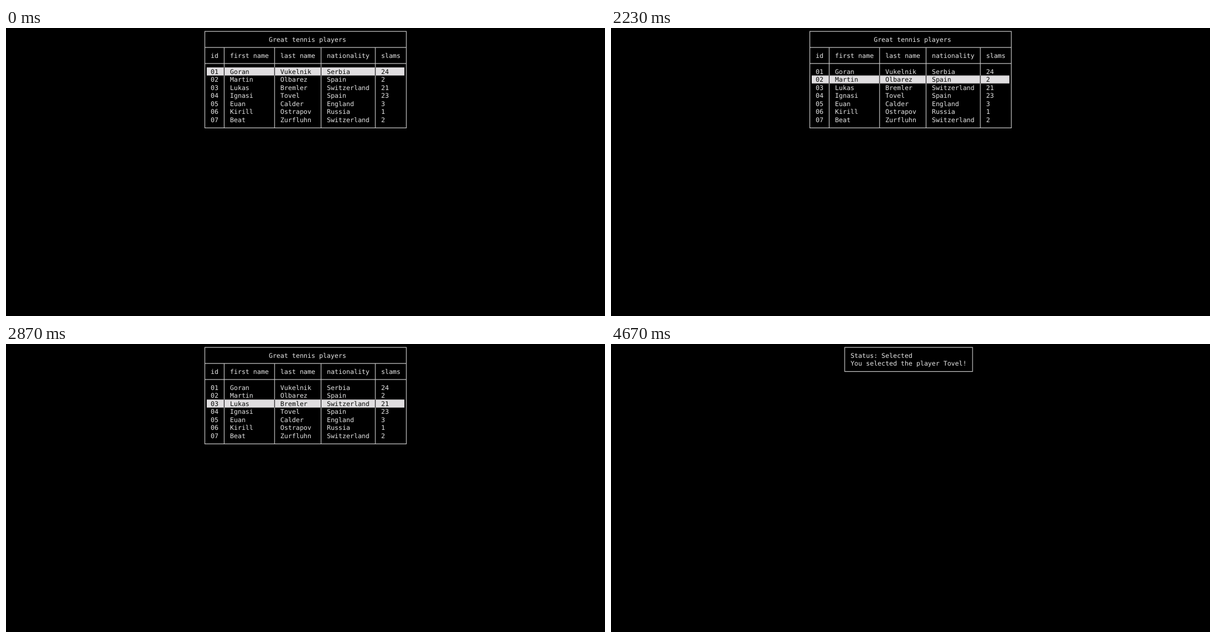
Write an HTML page that moves like this. It is 1077 px wide and 520 px high and loops after 6560 ms.

```html
<!DOCTYPE html>
<html lang="en">
<head>
<meta charset="utf-8">
<title>Player table</title>
<style>
  html, body { margin: 0; width: 100%; height: 100%; overflow: hidden; background: #000; }
  svg { display: block; width: 1077px; height: 520px; isolation: isolate; }
  text {
    font: 11.572px "DejaVu Sans Mono", monospace;
    fill: #e6e6e6;
    white-space: pre;
    text-rendering: geometricPrecision;
  }
  path { fill: none; stroke: #c6c6c6; stroke-width: 1.2; }
  /* Difference blending gives the terminal's reverse video. */
  #cursor { fill: #e0dee0; mix-blend-mode: difference; animation: pick 6560ms step-end infinite; }
  #table { animation: table 6560ms step-end infinite; }
  #status { animation: status 6560ms step-end infinite; }
  @keyframes pick {
    0% { transform: translateY(0); }
    33.994% { transform: translateY(14.55px); }
    40.091% { transform: translateY(29.1px); }
    47.256% { transform: translateY(43.65px); }
  }
  @keyframes table {
    0% { visibility: visible; }
    70.579%, 100% { visibility: hidden; }
  }
  @keyframes status {
    0% { visibility: hidden; }
    71.189%, 100% { visibility: visible; }
  }
</style>
</head>
<body>
<svg viewBox="0 0 1077 520">
  <g id="table"></g>
  <g id="status"></g>
</svg>
<script>
  const CELL = 6.967, ROW = 14.55, LEFT = 354, TOP = -1.55;
  const colX = c => LEFT + c * CELL;
  const rowY = r => TOP + r * ROW;
  const lineX = c => colX(c + 0.5);
  const lineY = r => 6.1 + r * 14.53;

  function add(parent, tag, attrs, content = "") {
    const node = document.createElementNS("http://www.w3.org/2000/svg", tag);
    for (const key in attrs) node.setAttribute(key, attrs[key]);
    node.textContent = content;
    parent.append(node);
  }

  const write = (parent, col, row, content) =>
    add(parent, "text", { x: colX(col), y: rowY(row) + 11.5 }, content);

  const frame = (c1, r1, c2, r2) =>
    `M${lineX(c1)} ${lineY(r1)}H${lineX(c2)}V${lineY(r2)}H${lineX(c1)}Z`;

  const columns = [2, 7, 20, 32, 46];
  const header = ["id", "first name", "last name", "nationality", "slams"];
  const players = [
    ["Goran", "Vukelnik", "Serbia", 24],
    ["Martin", "Olbarez", "Spain", 2],
    ["Lukas", "Bremler", "Switzerland", 21],
    ["Ignasi", "Tovel", "Spain", 23],
    ["Euan", "Calder", "England", 3],
    ["Kirill", "Ostrapov", "Russia", 1],
    ["Beat", "Zurfluhn", "Switzerland", 2]
  ];

  const table = document.getElementById("table");
  const status = document.getElementById("status");
  const writeRow = (row, cells) => cells.forEach((cell, i) => write(table, columns[i], row, cell));

  let grid = frame(0, 0, 52, 12);
  for (const r of [2, 4]) grid += `M${lineX(0)} ${lineY(r)}H${lineX(52)}`;
  for (const c of [5, 18, 30, 44]) grid += `M${lineX(c)} ${lineY(2)}V${lineY(12)}`;
  add(table, "path", { d: grid });

  write(table, 17, 1, "Great tennis players");
  writeRow(3, header);
  players.forEach((player, i) => writeRow(5 + i, ["0" + (i + 1), ...player]));
  add(table, "rect", { id: "cursor", x: colX(1), y: rowY(5), width: 51 * CELL, height: ROW });

  add(status, "path", { d: frame(9, 0, 42, 3) });
  write(status, 11, 1, "Status: Selected");
  write(status, 11, 2, `You selected the player ${players[3][1]}!`);
</script>
</body>
</html>
```
